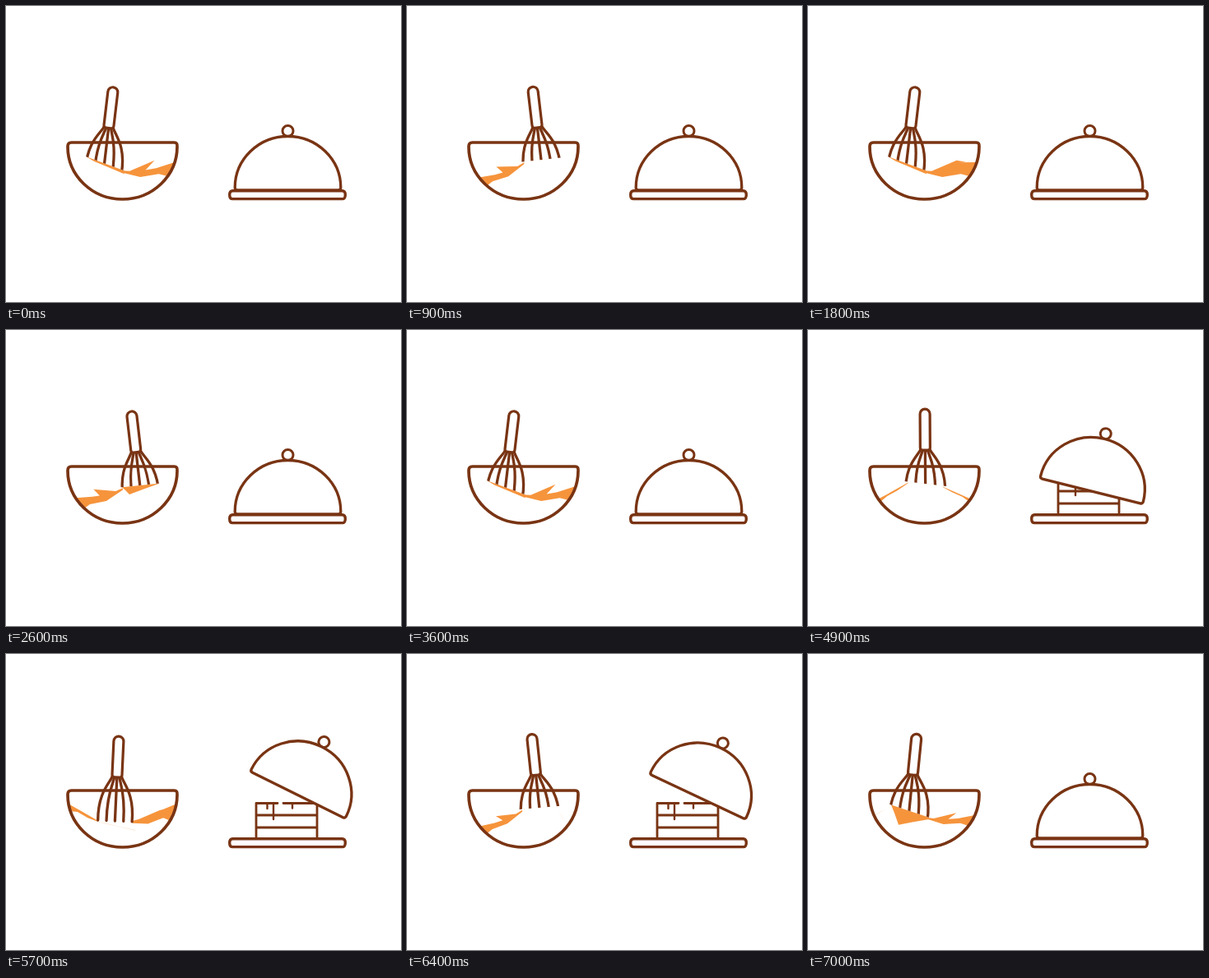
Animation, 480 px wide and 360 px high, one loop 7.1 s. Source, as an HTML page with a canvas:

```html
<!DOCTYPE html>
<html lang="en">
<head>
<meta charset="utf-8">
<title>Whisking and serving</title>
<style>
  html, body { margin: 0; width: 100%; height: 100%; overflow: hidden; background: #fff; }
  canvas { display: block; width: 480px; height: 360px; }
</style>
</head>
<body>
<canvas id="stage" width="480" height="360"></canvas>
<script>
const ctx = document.getElementById('stage').getContext('2d');
const LOOP = 7100, STEP = 100, TURN = 1800;
const BROWN = '#793413', ORANGE = '#f6943c';
const BOWL = 'M79.5 166 H204.5 Q208.5 166 208 171 A66.5 64 0 0 1 75 171 Q75 166 79.5 166 Z';

const clamp = v => Math.min(1, Math.max(0, v));
const ease = v => v < .5 ? 4 * v ** 3 : 1 - 4 * (1 - v) ** 3;
const ramp = (t, from, to) => ease(clamp((t - from) / (to - from)));
const mix = (a, b, k) => a + (b - a) * k;

function shape(path, fill, width) {
  const p = new Path2D(path);
  if (fill) { ctx.fillStyle = fill; ctx.fill(p); }
  ctx.lineWidth = width;
  ctx.stroke(p);
}

function polygon(points) {
  ctx.beginPath();
  for (const [x, y] of points) ctx.lineTo(x, y);
  ctx.closePath();
}

// The whisk circles in the bowl: side is -1 left to 1 right, back is -1 near to 1 far.
function whiskPose(t) {
  const angle = (263 - t / TURN * 360) * Math.PI / 180;
  const side = Math.sin(angle), back = Math.cos(angle);
  const x = 141.5 + 17 * side, y = 148.2 - 2 * back;
  const middle = x + 5 * side;
  const level = 187 + 26 * Math.max(0, -back - .15) + 4.5 * Math.max(0, -side);
  const surface = px => level + (.13 - .24 * side) * (px - middle);
  return { side, back, x, y, middle, surface };
}

// One arm of batter runs from the whisk to the bowl wall; d is -1 left, 1 right.
function drawArm({ side, back, middle, surface }, d, fullness) {
  const reach = Math.max(0, -d * side), near = Math.max(0, d * side);
  const front = Math.max(0, -back);
  const thick = (2 + 6 * front) * (1 - near) ** 1.5 + 5 * reach;
  const x0 = middle + d * 21, y0 = Math.min(surface(x0), 202) + 1;
  const y1 = 200 + 8 * side + back * (back < 0 ? 16 : 5);
  const x1 = 141.5 + d * 66.5 * Math.sqrt(1 - ((y1 - 171) / 64) ** 2);
  const at = (u, drop) => [mix(x0, x1, u), mix(y0, y1, u) + 16 * reach * u * (1 - u) + drop];
  const crest = 10 * reach ** 2;
  polygon([
    at(0, 0), at(.15, 0),
    at(.62, -crest),
    at(mix(.45, .8, fullness), -crest * .5 * fullness),
    at(.65, -crest * .7 * fullness), at(1, 0),
    at(1, 2.5 * thick), at(.7, thick), at(.35, thick), at(0, thick * .3)
  ]);
  ctx.fill();
}

function drawBatter(t, pose) {
  const { side, back, middle, surface } = pose;
  const fullness = (.5 - .5 * Math.cos(Math.PI * t / TURN)) ** 4;
  ctx.save();
  ctx.clip(new Path2D(BOWL));
  ctx.fillStyle = ORANGE;
  drawArm(pose, -1, fullness);
  drawArm(pose, 1, fullness);

  // Band below the wire tips, sagging while the whisk swings in from the back.
  const left = Math.max(0, -side) ** 3;
  const sag = 44 * Math.max(0, -side * back);
  const under = (dx, drop) => [middle + dx, surface(middle + dx) + drop];
  polygon([under(-22, 0), under(24, 0), under(24, 4 * left), under(5, 3 * left + sag * .5),
           under(-13, 2 * left + sag), under(-18, left + sag * .4)]);
  ctx.fill();
  ctx.restore();
}

function drawWhisk({ side, back, x, y, surface }) {
  const place = () => {
    ctx.translate(x, y);
    ctx.rotate(-side * 6.8 * Math.PI / 180);
  };

  // The batter surface hides the wire tips except at the front.
  ctx.save();
  polygon([[0, 0], [300, 0], [300, surface(300)], [0, surface(0)]]);
  ctx.clip();
  place();
  const spread = 1 + .08 * (1 + back);
  for (let i = -2; i <= 2; i++) {
    const w = i * spread;
    shape(`M${3 * i} 0 C${4.5 * w} 8 ${11 * w} 20 ${10.3 * w} 53`, null, 3.3);
  }
  ctx.restore();

  ctx.save();
  place();
  shape('M-6 -44 A6 6 0 0 1 6 -44 V-3 Q6 0 3 0 H-3 Q-6 0 -6 -3 Z', '#fff', 3.2);
  ctx.restore();
}

function drawCake() {
  shape('M304 223 V181.5 H330 M337 181.5 H378 V223 M304 196 H378 M304 211 H378', null, 2.8);
  shape('M317.5 182 V188 M325 182 V201 M348 182 V187.5', null, 2.4);
}

function drawLid(t) {
  const open = ramp(t, 4450, 5330) - ramp(t, 6250, 6950);
  ctx.save();
  ctx.translate(342.5 + 12 * open ** 3, 224 - 52.5 * open);
  ctx.rotate(open * 26.3 * Math.PI / 180);
  shape('M-6.5 -72 a6.5 6.5 0 1 1 13 0 a6.5 6.5 0 1 1 -13 0 Z', '#fff', 3);
  shape('M-64.3 -3 A64.3 62.5 0 0 1 64.3 -3 Q64.3 0 61.3 0 H-61.3 Q-64.3 0 -64.3 -3 Z', '#fff', 3.3);
  ctx.restore();
}

function draw(now) {
  const t = Math.floor(now % LOOP / STEP) * STEP;
  const pose = whiskPose(t);
  ctx.fillStyle = '#fff';
  ctx.fillRect(0, 0, 480, 360);
  ctx.strokeStyle = BROWN;
  ctx.lineCap = ctx.lineJoin = 'round';

  drawBatter(t, pose);
  drawWhisk(pose);
  shape(BOWL, null, 3.7);

  drawCake();
  drawLid(t);
  shape('M275.5 224.7 H408.5 Q412.3 224.7 412.3 229.7 T408.5 234.6 H275.5 Q271.7 234.6 271.7 229.7 T275.5 224.7 Z', '#fff', 3.4);
}

const start = performance.now();
function tick() {
  draw(performance.now() - start);
  requestAnimationFrame(tick);
}
tick();
</script>
</body>
</html>
```
